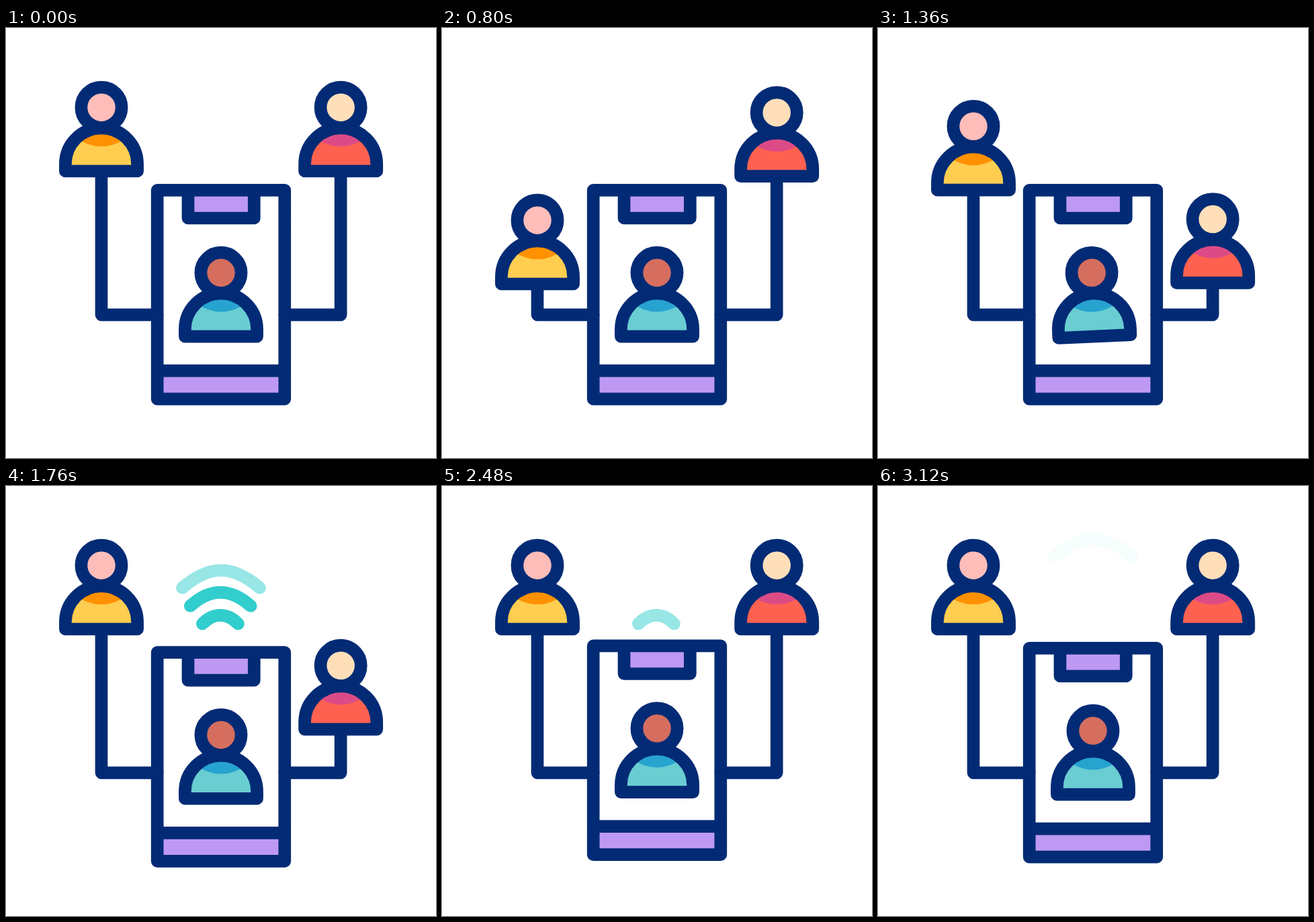
Write an HTML page that moves like this. It is 640 px wide and 640 px high and loops after 3.4 s.

```html
<!DOCTYPE html>
<html lang="en">
<head>
<meta charset="utf-8">
<title>Connected people</title>
<style>
  html, body { margin: 0; width: 100%; height: 100%; overflow: hidden; background: #fff; }
  svg { display: block; width: 100vw; height: 100vh; }
  .ink, .wave { stroke: #032b75; stroke-width: 18.7; stroke-linecap: round; stroke-linejoin: round; fill: none; }
  .wave { stroke: #32cdcd; }
  .lilac { fill: #bd99f3; }
</style>
</head>
<body>
<svg viewBox="0 0 640 640">
  <path id="leftWire" class="ink"/>
  <path id="rightWire" class="ink"/>
  <g id="left"></g>
  <g id="right"></g>
  <g id="waves">
    <path class="wave" d="M292.4 205C309 188.2 329 188.2 345.4 205"/>
    <path class="wave" d="M274.3 178.5C304 151.6 334 151.6 364.2 178.5"/>
    <path class="wave" d="M262.4 151.5C303 116.8 337 116.8 377.6 151.5"/>
  </g>
  <g id="phone">
    <path class="lilac" d="M271 241.4H369.3V283H271ZM225.2 510.2H414.8V552.2H225.2Z"/>
    <path class="ink" d="M225.2 241.4H414.8V552.2H225.2ZM225.2 510.2H414.8M271 241.4V283H369.3V241.4"/>
    <g id="owner"></g>
  </g>
</svg>
<script>
const LOOP = 3400, STEP = 40, LAST = 3120, WAVE_GAP = 840;
const el = id => document.getElementById(id);
const waves = [...el('waves').children];

// Keys are [time, value] pairs with an ease in and out between them.
const LEFT = [[0, 0], [600, 168], [916, 168], [1516, 0]];
const RIGHT = [[722, 0], [1322, 166.4], [1640, 166.4], [2240, 0]];
const PHONE = [[1640, 0], [1880, 12.3], [2240, -25.6], [2640, 8.5], [2880, 0]];
const TILT = [[1160, 0], [1400, -2.8], [1640, 0]];
const LIFT = [[1920, 0], [2300, -47]];

function drawPerson(id, head, body, collar) {
  const dome = 'M-53.6 94.8V84.2A53.6 53.6 0 0 1 53.6 84.2V94.8Z';
  el(id).innerHTML = `
    <path d="${dome}" fill="${body}"/>
    <path d="M-36.6 45A53.6 53.6 0 0 1 36.6 45A57.7 57.7 0 0 1 -36.6 45Z" fill="${collar}"/>
    <path class="ink" d="${dome}"/>
    <circle class="ink" r="30.1" style="fill:${head}"/>`;
}

function at(keys, t) {
  if (t <= keys[0][0]) return keys[0][1];
  for (let i = 1; i < keys.length; i++) {
    const [t0, a] = keys[i - 1], [t1, b] = keys[i];
    if (t < t1) {
      const p = (t - t0) / (t1 - t0);
      return a + (b - a) * p * p * (3 - 2 * p);
    }
  }
  return keys[keys.length - 1][1];
}

const ramp = (t, start) => Math.min(1, Math.max(0, (t - start) / 120));
const place = (id, x, y, turn = '') => el(id).setAttribute('transform', `translate(${x} ${y}) ${turn}`);

function contact(id, x, y, phoneX) {
  place(id, x, 118.2 + y);
  el(id + 'Wire').setAttribute('d', `M${x} ${213 + y}V426.8H${phoneX}`);
}

function render(t) {
  contact('left', 142, at(LEFT, t), 225.2);
  contact('right', 498.2, at(RIGHT, t), 414.8);
  place('phone', 0, at(PHONE, t));
  place('owner', 320, 364.3, `rotate(${at(TILT, t)} 0 41)`);

  const w = t < 2400 ? t : t - WAVE_GAP;
  place('waves', 0, at(LIFT, w));
  waves.forEach((wave, i) => {
    const alpha = ramp(w, 1580 + 60 * i) - ramp(w, 2005 + 80 * i);
    wave.setAttribute('opacity', Math.max(0, alpha));
  });
}

drawPerson('left', '#ffbdb9', '#ffcd50', '#ff9100');
drawPerson('right', '#ffdfba', '#ff6151', '#dd4b86');
drawPerson('owner', '#d56e5f', '#69cdd2', '#27a3cf');

const start = performance.now();
function tick(now) {
  const t = Math.max(0, now - start) % LOOP;
  render(Math.min(LAST, Math.floor(t / STEP) * STEP));
  requestAnimationFrame(tick);
}
render(0);
requestAnimationFrame(tick);
</script>
</body>
</html>
```
